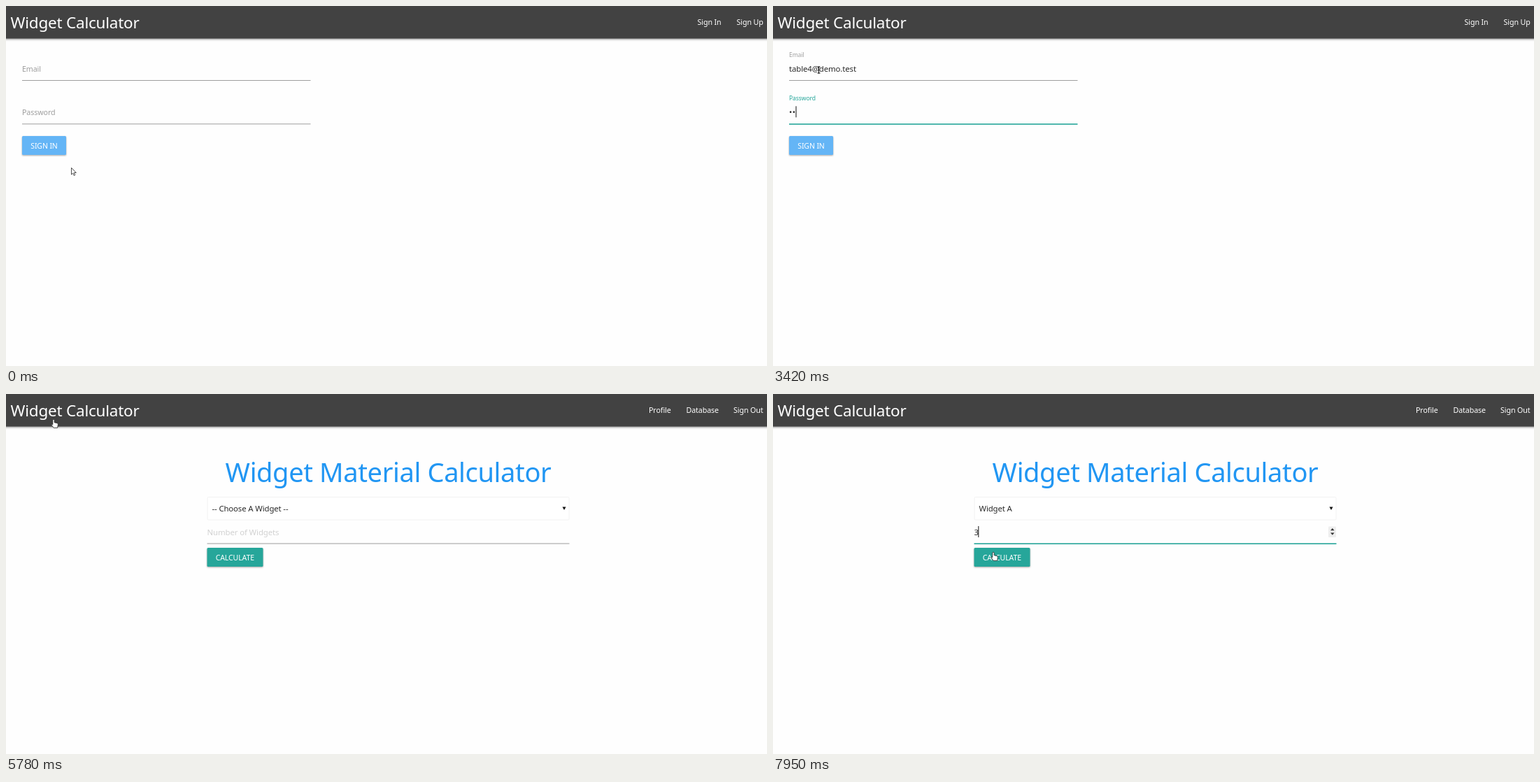
An HTML page for the animation above (8000 ms loop, 1088x515 px).

```html
<!DOCTYPE html>
<html lang="en">
<head>
<meta charset="utf-8">
<title>Widget Calculator</title>
<style>
html, body { margin: 0; width: 100%; height: 100%; overflow: hidden; background: #fefefe; }
svg { display: block; width: 1088px; height: 515px; }
text { font: 10.7px "Noto Sans", "Open Sans", sans-serif; letter-spacing: -.01em; fill: #2a2a2a; white-space: pre; }
.nav { filter: drop-shadow(0 1px 1.5px rgba(0,0,0,.5)); }
.raised { filter: drop-shadow(0 1px 1px rgba(0,0,0,.35)); }
.mid { text-anchor: middle; }
.white { fill: #fff; }
.brand { font-size: 22.5px; }
.caps { font-size: 10.5px; }
.input { font-size: 11.4px; }
#password .input { letter-spacing: .04em; }
.choice { font-size: 11.35px; }
.bold { font-weight: 700; font-size: 12.7px; }
.hint { font-weight: 600; font-size: 9.2px; }
.rule { stroke: #bdbdbd; }
.caret { fill: #111; }
.beam { mix-blend-mode: difference; stroke: #fff; fill: none; }
.arrow, .hand { fill: #fff; stroke: #222; stroke-width: .8; stroke-linejoin: round; }
</style>
</head>
<body>
<svg viewBox="0 0 1088 515">
  <rect width="1088" height="515" fill="#fefefe"/>

  <g id="login">
    <g id="email"></g>
    <g id="password"></g>
    <rect class="raised" x="23" y="186" width="63" height="27" rx="1.5" fill="#64b5f6"/>
    <text class="caps white mid" x="54.5" y="204">SIGN IN</text>
    <path id="squiggle" fill="none" stroke="#e53935" stroke-width=".8"/>
    <g id="hints"></g>
  </g>

  <g id="profile">
    <text id="hello" class="mid" x="540" y="114" style="font-size:31.2px">Hello, table4@demo.test</text>
    <g id="card">
      <rect class="raised" x="281" y="131" width="518" height="380" rx="1.5" fill="#f5f5f5"/>
      <text class="bold" x="288.5" y="159">Calculation #1: 2019-12-01</text>
      <rect class="raised" x="732.5" y="139" width="59.5" height="27" rx="1.5" fill="#e57373"/>
      <text class="caps white mid" x="762" y="157">DELETE</text>
      <g id="needs"></g>
      <path class="rule" d="M288.5 294H792M288.5 411.3H792"/>
      <text class="bold mid" x="540.5" y="315" style="font-size:12.2px">Total Material Needed:</text>
      <g id="totals"></g>
      <rect class="raised" x="288.5" y="418" width="503.5" height="74.5" rx="1.5" fill="#e8f5e9"/>
      <text class="mid" x="540.5" y="465" style="font-size:17.3px">Results are in sync with database</text>
    </g>
  </g>

  <g id="calc">
    <text class="mid" x="546.5" y="126" style="font-size:38.1px;fill:#2196f3">Widget Material Calculator</text>
    <rect id="select" x="288" y="147.5" width="517" height="32.5" rx="1.5" fill="#fff"/>
    <text id="chosen" class="choice" x="294.5" y="168"></text>
    <path d="M795.5 161.5h5l-2.5 4.5z" fill="#111"/>
    <text id="count" class="input" x="287.5" y="202"></text>
    <rect id="countLine" x="287.5" width="518"/>
    <g id="spinner">
      <rect x="794" y="189.5" width="11" height="15.5" rx="1" fill="#eee"/>
      <path d="M797 195.2h5.6l-2.8-3.2zM797 198.6h5.6l-2.8 3.2z" fill="#333"/>
      <rect id="countCaret" class="caret" y="189" width="1" height="16"/>
    </g>
    <rect class="raised" x="287.5" y="220" width="80" height="27" rx="1.5" fill="#26a69a"/>
    <text class="caps white mid" x="327.3" y="238">CALCULATE</text>
    <g id="popup"></g>
    <g id="numbers"></g>
  </g>

  <rect class="nav" x="-4" y="-4" width="1096" height="50.5" fill="#424242"/>
  <text class="brand white" x="6.5" y="32.3">Widget Calculator</text>
  <g id="guestLinks">
    <text class="white" x="988.5" y="27.3">Sign In</text>
    <text class="white" x="1044.5" y="27.3">Sign Up</text>
  </g>
  <g id="userLinks">
    <text class="white" x="919" y="27.3">Profile</text>
    <text class="white" x="972.5" y="27.3">Database</text>
    <text class="white" x="1040" y="27.3">Sign Out</text>
  </g>
  <g id="scrollbar">
    <rect x="1082" width="6" height="515" fill="#f1f1f1"/>
    <rect x="1083.5" y="13" width="4.5" height="502" fill="#c1c1c1"/>
    <path d="M1085 8l3-3.5v3.5z" fill="#777"/>
  </g>

  <g id="pointer">
    <path class="arrow" d="M-.5-.5V9.1L1.7 7.1L3.2 10.5L4.8 9.8L3.3 6.5H6.3Z"/>
    <path class="beam" d="M-2-4.5H2M0-5V5M-2 4.5H2"/>
    <path class="hand" d="M-.2 1Q1 -.8 2.2 1V4.8L6 5.6Q7.6 6 7.4 7.8L6.6 12.4H1.2L-2 8.2Q-2.2 6.4-.2 7.8Z"/>
  </g>
</svg>
<script>
const LOOP = 8000, TEAL = [38, 166, 154], GREY = [158, 158, 158];
const EMAIL = 'table4@demo.test';
const HINTS = [EMAIL, 'Table4@demo.test', 'table45@demo.test', 'table1@demo.test', 'table2@demo.test', 'table3@demo.test'];
const KEYS = [1080, 1160, 1310, 1390, 1540, 1710, 2020, 2170, 2250, 2330, 2410, 2560, 2730, 2810, 2890, 2960];
const DOTS = [3340, 3415, 3510, 3660, 3810, 3970];
const FOCUS = 420, TAB = 3020, SIGNED_IN = 4290, LOADED = 4360, HOME = 5700;
const OPEN = 6480, HOVER = 6935, PICK = 7090, COUNT = 7480, DIGIT = 7720, CLOSE = 7945;

// Bursts of screen updates: first, last, steps.
const BURSTS = [[70, 290, 4], [460, 780, 5], [2730, 3510, 11], [5220, 6020, 11],
  [6090, 6320, 4], [6480, 6940, 7], [7090, 7170, 2], [7490, 7950, 7]];
const TICKS = BURSTS.flatMap(([a, b, n]) => Array.from({length: n}, (_, i) => a + (b - a) * i / (n - 1)));
const PATH = [[0, 94, 232], [290, 65.5, 91.5], [5150, 65.5, 91.5], [5400, 40, 56], [5560, 64, 38], [5640, 67, 36],
  [5785, 67, 36], [6020, 249, 130], [6320, 323, 166], [6560, 323, 166], [6860, 330, 196], [6940, 330, 202],
  [7800, 330, 202], [7950, 314, 226]];

const $ = id => document.getElementById(id);
const show = (el, on) => el.style.display = on ? '' : 'none';
const clamp = v => Math.max(0, Math.min(1, v));
const ease = v => 1 - (1 - clamp(v)) ** 2;
const mix = (a, b, k) => a + (b - a) * k;
const blend = (a, b, k) => `rgb(${a.map((v, i) => Math.round(mix(v, b[i], k)))})`;
const passed = (times, t) => times.filter(v => v <= t).length;
const snap = t => TICKS.reduce((last, v) => v <= t + 15 ? v : last, 0);
const text = (cls, x, y, s) => `<text class="${cls}" x="${x}" y="${y}">${s}</text>`;
function fill(el, html) {
  if (el.key !== html) el.innerHTML = el.key = html;
}

const NEEDS = [
  [288.5, 185, 'Widget: Widget A | QTY: 23'],
  [300, 201.5, 'Material Needed: 23 Sheets of Aluminum, 115 Sheets of Cold Rolled Steel, 138 Sheets of Galvanneal,'],
  [300, 218, '161 Sheets of Glass, 184 Sheets of Stainless Steel'],
  [288.5, 251, 'Widget: Widget C | QTY: 24'],
  [300, 268, 'Material Needed: 48 Sheets of Aluminum, 48 Sheets of Cold Rolled Steel, 48 Sheets of Galvanneal,'],
  [300, 284.5, '48 Sheets of Glass, 48 Sheets of Stainless Steel']];
const TOTALS = ['71 Sheets of Aluminum', '163 Sheets of Cold Rolled Steel', '186 Sheets of Galvanneal',
  '209 Sheets of Glass', '232 Sheets of Stainless Steel'];
fill($('needs'), NEEDS.map(n => text('', ...n)).join(''));
fill($('totals'), TOTALS.map((s, i) => text('mid', 540.5, 335.3 + 16.6 * i, s)).join(''));

let wave = 'M23 96';
for (let x = 23; x < 65; x += 3) wave += 'l1.5-1.4l1.5 1.4';
$('squiggle').setAttribute('d', wave);

function makeField(id, y, name) {
  const g = $(id);
  g.innerHTML = text('label', 0, 0, name) + text('input', 23, y, '') +
    `<rect class="line" x="23" width="412.5"/><rect class="caret" y="${y - 13}" width="1" height="16"/>`;
  const [label, value, line, caret] = g.children;
  return (typed, rise, glow, focused) => {
    const color = blend(GREY, TEAL, glow);
    label.setAttribute('transform', `translate(23 ${mix(y, y - 21.5, rise)}) scale(${mix(1, .8, rise)})`);
    label.style.fill = color;
    value.textContent = typed;
    drawLine(line, y + 12, glow);
    show(caret, focused);
    caret.setAttribute('x', 23 + (typed ? value.getComputedTextLength() : 0));
  };
}

function drawLine(line, y, glow) {
  line.setAttribute('y', y - .1 * glow);
  line.setAttribute('height', 1 + .6 * glow);
  line.setAttribute('fill', blend(GREY, TEAL, glow));
}

function hintList(x, y, rows) {
  if (!rows.length) return '';
  return `<rect class="raised" x="${x}" y="${y}" width="143" height="${12 + 26.6 * rows.length}" rx="2" fill="#fff"/>` +
    rows.map((s, i) => text('hint', x + 9, y + 22.7 + 26.6 * i, s)).join('');
}

function optionList(active) {
  const rows = ['-- Choose A Widget --', 'Widget A', 'Widget B', 'Widget C'];
  return '<rect x="288.5" y="180.5" width="516.5" height="64" fill="#fff" stroke="#7f9ddb"/>' +
    `<rect x="289" y="${180.5 + 16 * active}" width="515.5" height="16" fill="#1e90ff"/>` +
    rows.map((s, i) => text('choice' + (i === active ? ' white' : ''), 295.5, 193 + 16 * i, s)).join('');
}

const drawEmail = makeField('email', 94, 'Email');
const drawPassword = makeField('password', 156.3, 'Password');

function drawLogin(t, s) {
  const typed = EMAIL.slice(0, passed(KEYS, t));
  const onEmail = t >= FOCUS + 40 && t < TAB;
  const up = ease((s - FOCUS) / 300), next = ease((s - TAB) / 300);
  drawEmail(typed, up, up - next, onEmail);
  drawPassword('•'.repeat(passed(DOTS, t)), next, next, t >= TAB);
  show($('squiggle'), t >= 2020 && t < TAB);
  const rows = onEmail && typed ? HINTS.filter(h => h.toLowerCase().startsWith(typed)) : [];
  fill($('hints'), hintList(23, 107.5, rows));
}

function drawProfile(t) {
  const loaded = t >= LOADED;
  show($('card'), loaded);
  $('hello').setAttribute('x', loaded ? 540 : 546.5);
}

function drawCalc(t, s) {
  const counting = t >= COUNT, count = $('count');
  const glow = ease((s - COUNT) / 300);
  $('select').setAttribute('stroke', t >= OPEN && !counting ? '#cdeeea' : '#f2f2f2');
  $('chosen').textContent = t >= PICK ? 'Widget A' : '-- Choose A Widget --';
  fill($('popup'), t >= OPEN && t < PICK ? optionList(t >= HOVER ? 1 : 0) : '');
  const digit = t >= DIGIT;
  count.textContent = digit ? '3' : 'Number of Widgets';
  count.style.fill = digit ? '' : '#d1d1d1';
  drawLine($('countLine'), 213.5, glow);
  show($('spinner'), counting);
  $('countCaret').setAttribute('x', digit ? 293.3 : 288);
  fill($('numbers'), digit && t < CLOSE ? hintList(288, 215, ['3', '32', '35']) : '');
}

function drawPointer(t, s) {
  let i = PATH.findIndex(p => p[0] > s);
  if (i < 0) i = PATH.length - 1;
  const [a, ax, ay] = PATH[i - 1], [b, bx, by] = PATH[i];
  const k = clamp((s - a) / (b - a)), x = mix(ax, bx, k), y = mix(ay, by, k);
  let kind = 0;
  if (t < SIGNED_IN) kind = y < 107 ? 1 : 0;
  else if (y < 47) kind = 2;
  else if (t >= PICK) kind = y > 219 ? 2 : 1;
  [...$('pointer').children].forEach((el, n) => {
    show(el, n === kind);
    el.setAttribute('transform', `translate(${x} ${y})`);
  });
}

function render(t) {
  const s = snap(t), login = t < SIGNED_IN, calc = t >= HOME;
  const scrolling = t >= LOADED && !calc;
  show($('login'), login);
  show($('guestLinks'), login);
  show($('profile'), !login && !calc);
  show($('calc'), calc);
  show($('userLinks'), !login);
  show($('scrollbar'), scrolling);
  $('userLinks').setAttribute('transform', `translate(${scrolling ? -12.5 : 0} 0)`);
  if (login) drawLogin(t, s);
  else if (calc) drawCalc(t, s);
  else drawProfile(t);
  drawPointer(t, s);
}

const start = performance.now();
function frame() {
  render((performance.now() - start) % LOOP);
  requestAnimationFrame(frame);
}
frame();
</script>
</body>
</html>
```
